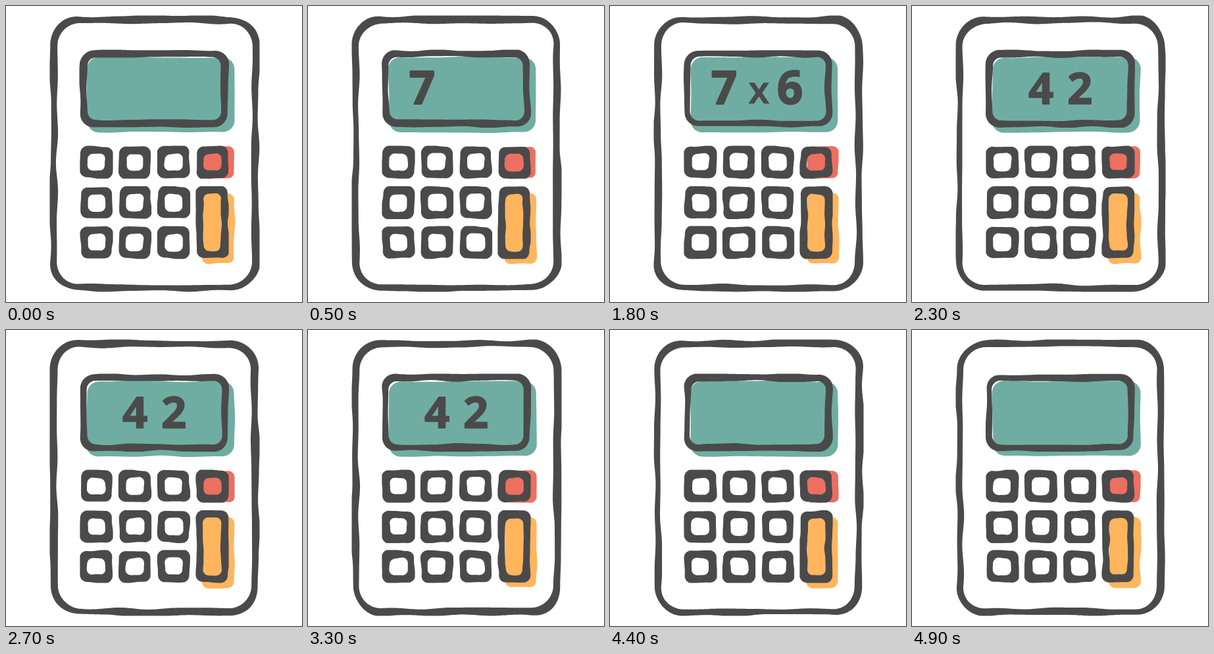
Animation of 450x450 px, one loop 5000 ms. Source, as an HTML page:

```html
<!DOCTYPE html>
<html lang="en">
<head>
<meta charset="utf-8">
<title>Calculator</title>
<style>
  html, body { margin: 0; width: 100%; height: 100%; overflow: hidden; background: #fff; }
  svg { display: block; width: 100%; height: 100%; }
  text {
    font: 700 67px "Open Sans", "Noto Sans", sans-serif; text-anchor: middle;
    fill: #4a4a4a; stroke: #4a4a4a; stroke-width: 1.6px; stroke-linejoin: round;
  }
  .big { font-size: 69px; stroke-width: 2px; }
  .times { font-size: 58px; font-weight: 600; stroke-width: 1px; }
</style>
</head>
<body>
<svg viewBox="0 0 450 450">
  <path id="teal" fill="#6fada2"/>
  <path id="red" fill="#ec6f60"/>
  <path id="orange" fill="#ffb55d"/>
  <path id="ink" fill="#4a4a4a" fill-rule="evenodd"/>
  <text class="big" x="173.5" y="149" data-from="400" data-to="2300">7</text>
  <text class="times" x="226.5" y="148" data-from="900" data-to="2300">x</text>
  <text class="big" x="273.5" y="149" data-from="1400" data-to="2300">6</text>
  <text x="196" y="148.5" data-from="2300" data-to="3700">4</text>
  <text x="255" y="148.5" data-from="2300" data-to="3700">2</text>
</svg>
<script>
const LOOP = 5000, STEP = 100;
const byId = id => document.getElementById(id);
const labels = [...document.querySelectorAll('text')];
const clamp = (v, lo, hi) => Math.max(lo, Math.min(hi, v));

let seed = 1;
function rand() {
  seed = (seed + 0x6D2B79F5) | 0;
  let t = Math.imul(seed ^ (seed >>> 15), 1 | seed);
  t = (t + Math.imul(t ^ (t >>> 7), 61 | t)) ^ t;
  return ((t ^ (t >>> 14)) >>> 0) / 4294967296;
}

// Smooth cyclic noise in -1..1 along a closed line
function noise(length, wave) {
  const n = Math.round(length / wave);
  const knots = Array.from({ length: n }, () => rand() * 2 - 1);
  return s => {
    const u = s / length * n, i = Math.floor(u), f = u - i;
    const a = knots[i % n], b = knots[(i + 1) % n];
    return a + (b - a) * f * f * (3 - 2 * f);
  };
}

// Rounded rectangle whose edge wobbles, kept within `room` of its box
function blob(x0, y0, x1, y1, r, amp, wave, room = 9) {
  const w = x1 - x0 - 2 * r, h = y1 - y0 - 2 * r, arc = r * Math.PI / 2;
  const wobble = noise(2 * (w + h) + 4 * arc, wave);
  const corners = [[x1 - r, y1 - r], [x0 + r, y1 - r], [x0 + r, y0 + r], [x1 - r, y0 + r]];
  const points = [];
  let s = 0;
  const add = (x, y, angle, at) => {
    const d = r + amp * wobble(at);
    const px = clamp(x + d * Math.cos(angle), x0 - room, x1 + room);
    const py = clamp(y + d * Math.sin(angle), y0 - room, y1 + room);
    points.push(px.toFixed(2) + ' ' + py.toFixed(2));
  };
  corners.forEach(([cx, cy], q) => {
    const start = q * Math.PI / 2, end = start + Math.PI / 2;
    const turns = Math.ceil(arc / 2);
    for (let i = 0; i < turns; i++) {
      const f = i / turns;
      add(cx, cy, start + f * Math.PI / 2, s + f * arc);
    }
    s += arc;
    const [nx, ny] = corners[(q + 1) % 4], side = q % 2 ? h : w;
    const parts = Math.ceil(side / 3);
    for (let i = 0; i < parts; i++) {
      const f = i / parts;
      add(cx + (nx - cx) * f, cy + (ny - cy) * f, end, s + f * side);
    }
    s += side;
  });
  return 'M' + points.join('L') + 'Z';
}

function key(x, y, height = 49) {
  return blob(x, y, x + 49, y + height, 11, 1.6, 22, .6) +
         blob(x + 11, y + 11.5, x + 38, y + height - 11.5, 8, 1.3, 17);
}

function draw(step) {
  seed = step * 7919 + 17;
  byId('teal').setAttribute('d', blob(122.5, 78, 347, 192, 18, 1.2, 40, 1));
  byId('red').setAttribute('d', blob(299, 213.5, 347, 262, 9, 1.2, 22, .6));
  byId('orange').setAttribute('d', blob(299, 284, 347.5, 392, 10, 1.4, 26, 1));

  let ink = blob(67.5, 15.5, 384.5, 433.5, 44, 2.2, 44, 1) +
            blob(77.5, 26, 373.5, 423.5, 35, 1.8, 44) +
            blob(112.5, 67.5, 338, 184, 21, 1.7, 38, 1) +
            blob(122.5, 77.5, 327.5, 173.5, 13, 1.6, 36);
  for (const y of [213, 274.5, 335])
    for (const x of [113, 171.5, 230.5]) ink += key(x, y);
  ink += key(289, 213) + key(289, 274.5, 109.5);
  byId('ink').setAttribute('d', ink);

  const t = step * STEP;
  for (const el of labels) {
    const on = t >= +el.dataset.from && t < +el.dataset.to;
    el.style.visibility = on ? 'visible' : 'hidden';
  }
}

const begin = performance.now();
let shown = -1;
function tick() {
  const step = Math.floor((performance.now() - begin) % LOOP / STEP);
  if (step !== shown) draw(shown = step);
  requestAnimationFrame(tick);
}
tick();
</script>
</body>
</html>
```
